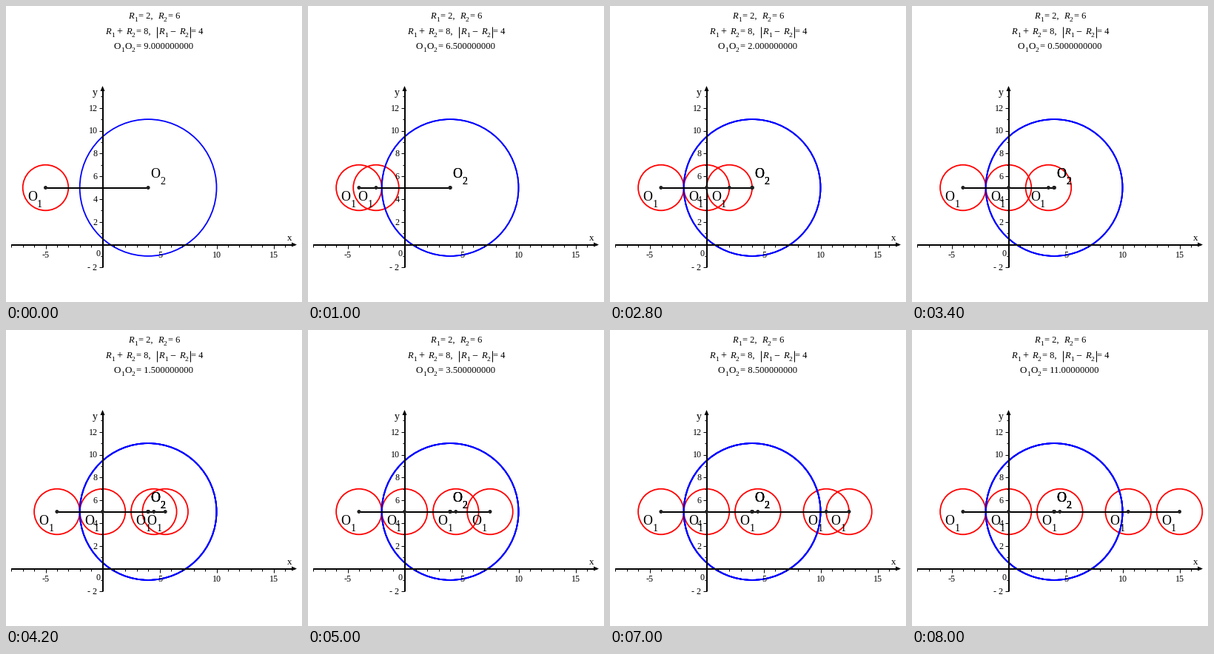
Animation of 400x400 px, one loop 8.2 s. Source, as a matplotlib script:

```python
import matplotlib.pyplot as plt
from matplotlib.animation import FuncAnimation
from matplotlib.patches import Circle, Polygon

SIZE, DPI = 400, 100
UNIT, OX, OY = 15.4, 130.5, 322.5
R1, R2, CENTER = 2, 6, (4, 5)
START, STEP, FRAMES = -5, 0.5, 41
TRACED = (2, 10, 19, 31)

fig = plt.figure(figsize=(SIZE / DPI, SIZE / DPI), dpi=DPI, facecolor="white")
ax = fig.add_axes([0, 0, 1, 1])
ax.set(xlim=(0, SIZE), ylim=(SIZE, 0))
ax.axis("off")


def pt(size):
    return size * 72 / DPI


def px(x, y):
    return OX + UNIT * x, OY - UNIT * y


def line(x0, y0, x1, y1, width=1):
    return ax.plot([x0, x1], [y0, y1], color="black", lw=pt(width),
                   solid_capstyle="butt")[0]


def write(x, y, s, size, **kw):
    return ax.text(x, y, s, fontsize=pt(size), family="Liberation Serif",
                   color="black", va="baseline", **kw)


def ring(x, y, r, color):
    return ax.add_patch(Circle(px(x, y), r * UNIT, fill=False, ec=color, lw=pt(1.8)))


def dot(x, y):
    return ax.add_patch(Circle(px(x, y), 2.5, fc="#202020", lw=0, zorder=3))


def label(x, y, digit):
    return [write(x, y, "O", 18), write(x + 13, y + 9, digit, 14)]


def draw_axes():
    line(7, OY, 391, OY, 2)
    line(OX, 353, OX, 111, 2)
    ax.add_patch(Polygon([(393, OY), (386, OY - 3), (386, OY + 3)], fc="black", lw=0))
    ax.add_patch(Polygon([(OX, 108), (OX - 3, 115), (OX + 3, 115)], fc="black", lw=0))
    for v in range(-8, 17):
        x = px(v, 0)[0]
        line(x, OY, x, OY + (5 if v % 5 == 0 else 3))
    for v in range(-2, 14):
        y = px(0, v)[1]
        line(OX - (5 if v % 2 == 0 else 3), y, OX, y)
    for v in (-5, 5, 10, 15):
        write(px(v, 0)[0] + 0.5, 340, f"{v}", 12, ha="center")
    for v in (-2, 2, 4, 6, 8, 10, 12):
        write(123.5, px(0, v)[1] + 4, f"{v}".replace("-", "- "), 12, ha="right")
    write(122, 338, "0", 12)
    write(117, 121, "y", 14)
    write(380, 317, "x", 13)


def radius(x, y, digit):
    write(x, y, "R", 12.5, style="italic")
    write(x + 8, y + 4, digit, 9.5)


def draw_title():
    radius(165, 17, "1")
    write(179, 17, "= 2,", 12.5)
    radius(205, 17, "2")
    write(219, 17, "= 6", 12.5)
    radius(134, 38, "1")
    write(149.5, 38, "+", 14)
    radius(162, 38, "2")
    write(176, 38, "= 8,", 12.5)
    line(203.5, 28, 203.5, 43)
    radius(206, 38, "1")
    write(221, 38, "\u2212", 14)
    radius(234, 38, "2")
    line(248.5, 28, 248.5, 43)
    write(250.5, 38, "= 4", 12.5)


def scene(x):
    """One complete drawing with the small circle centred at x."""
    cx, cy = px(x, CENTER[1])
    tx, ty = px(*CENTER)
    return [ring(x, CENTER[1], R1, "red"), ring(*CENTER, R2, "blue"),
            line(cx, cy, tx, ty, 2), dot(x, CENTER[1]), dot(*CENTER),
            *label(cx - 24.5, 263, "1"), *label(195, 232, "2")]


def distance_title(d):
    value = f"{d:#.10g}" if d else "0."
    x = 200.5 - (41 + 6.25 * len(value)) / 2
    parts = []
    for digit in "12":
        parts += [write(x, 58, "O", 13), write(x + 9.2, 62, digit, 9.5)]
        x += 14.5
    return parts + [write(x + 1.5, 58, "= " + value, 12.6)]


def update(k):
    while live:
        live.pop().remove()
    for t in TRACED:
        if t < k:
            live.extend(scene(START + STEP * t))
    x = START + STEP * k
    live.extend(scene(x))
    live.extend(distance_title(abs(CENTER[0] - x)))
    return live


live = []
draw_axes()
draw_title()
anim = FuncAnimation(fig, update, frames=FRAMES, interval=200,
                     init_func=lambda: [], repeat=True, repeat_delay=0, blit=False)
plt.show()
```
